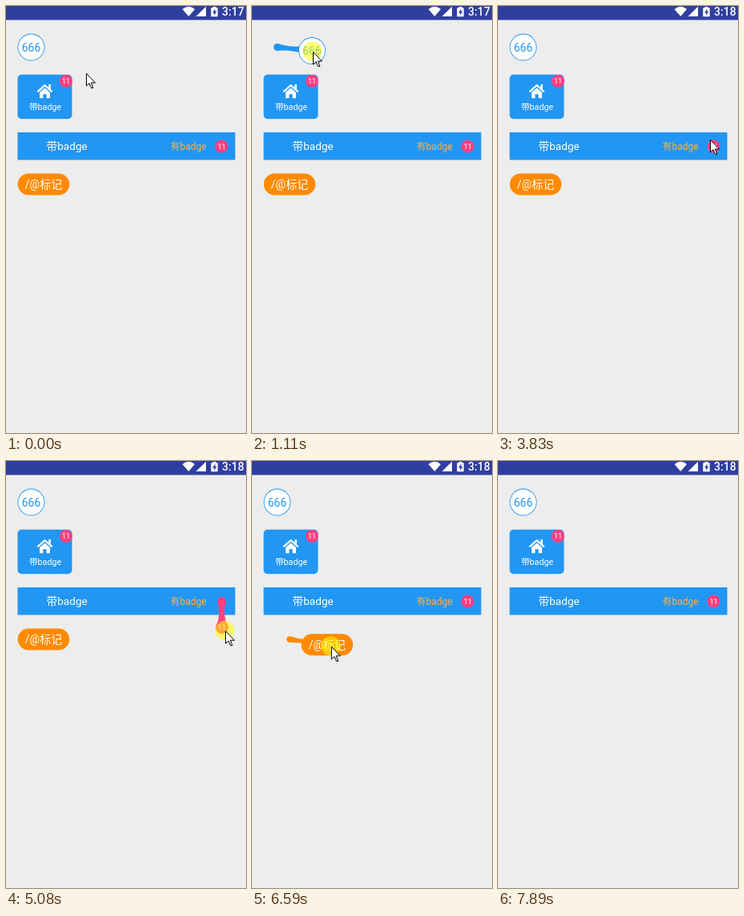
Write an HTML page with a canvas that moves like this. It is 300 px wide and 534 px high and loops after 8 s.

```html
<!DOCTYPE html>
<html lang="zh">
<head>
<meta charset="utf-8">
<style>
html, body { margin: 0; width: 100%; height: 100%; overflow: hidden; background: #ededed; }
canvas { display: block; width: 300px; height: 534px; }
</style>
</head>
<body>
<canvas id="stage" width="300" height="534"></canvas>
<script>
const c = document.getElementById('stage').getContext('2d');
const LOOP = 8000, BLUE = '#2196f3', PINK = '#ff4081', ORANGE = '#ff8a00';
const FONT = 'Roboto, "Noto Sans CJK SC", "Noto Sans CJK", sans-serif';

// pointer moves: start, end, x, y; it rests in between
const start = [100, 84];
const moves = [
  [30, 480, 34, 53], [560, 820, 60, 50], [870, 1110, 76, 57], [1610, 2200, 81, 88],
  [2430, 2540, 82, 90], [3230, 3620, 286, 170], [3620, 3830, 265, 167], [4010, 4160, 268, 175],
  [4340, 4860, 274, 212], [5080, 5300, 271, 248], [5710, 6250, 54, 225], [6300, 6990, 127, 236],
  [7140, 7230, 134, 239], [7420, 7560, 122, 242], [7710, 7890, 190, 176]
];

// w, h: half sizes; band: elastic radius; grip: centre relative to the pointer while dragged
// back: when it reappears after bursting; without it the badge springs home
const badges = [
  { x: 31.5, y: 51.5, w: 17, h: 17, band: 8, color: BLUE, fill: '#fff', label: '666', size: 14, from: 560, to: 1610, grip: [-1, -1] },
  { x: 75, y: 94, w: 8, h: 8, band: 8, color: PINK, label: '11', size: 9, from: 2430, to: 3230, grip: [-10, -0.5] },
  { x: 269.5, y: 175.5, w: 8, h: 8, band: 8, color: PINK, label: '11', size: 9, from: 4340, to: 5300, grip: [-4, -4], back: 5750 },
  { x: 47, y: 223, w: 32.3, h: 13.5, band: 7, color: ORANGE, label: '/@标记', size: 14, from: 6300, to: 7430, grip: [-5, -2], back: LOOP }
];

function pointer(t) {
  let [x, y] = start;
  for (const [from, to, nx, ny] of moves) {
    if (t <= from) break;
    const e = Math.sin(Math.min(1, (t - from) / (to - from)) * Math.PI / 2);
    x += (nx - x) * e;
    y += (ny - y) * e;
  }
  return [x, y];
}

function text(s, x, y, size, color = '#fff', align = 'center', weight = 400) {
  c.font = `${weight} ${size}px ${FONT}`;
  c.textAlign = align;
  c.fillStyle = color;
  c.fillText(s, x, y);
}

function box(x, y, w, h, r, color) {
  c.fillStyle = color;
  c.beginPath();
  c.roundRect(x, y, w, h, r);
  c.fill();
}

function disc(x, y, r, color) {
  box(x - r, y - r, 2 * r, 2 * r, r, color);
}

function shape(d, color) {
  c.fillStyle = color;
  c.fill(new Path2D(d));
}

function pill(b, x, y) {
  box(x - b.w, y - b.h, 2 * b.w, 2 * b.h, b.h, b.color);
  if (b.fill) disc(x, y, b.w - 0.9, b.fill);
  text(b.label, x, y + b.size * 0.36, b.size, b.fill ? b.color : '#fff');
}

// elastic band between the resting place and the dragged badge
function band(b, x, y) {
  const vx = x - b.x, vy = y - b.y, d = Math.hypot(vx, vy);
  if (d < 1 || d > 60) return;
  const R = b.band, r = R * (1 - d / 100), nx = -vy / d, ny = vx / d;
  const mx = (x + b.x) / 2, my = (y + b.y) / 2;
  disc(b.x, b.y, r, b.color);
  c.beginPath();
  c.moveTo(b.x + nx * r, b.y + ny * r);
  c.quadraticCurveTo(mx, my, x + nx * R, y + ny * R);
  c.lineTo(x - nx * R, y - ny * R);
  c.quadraticCurveTo(mx, my, b.x - nx * r, b.y - ny * r);
  c.fill();
}

function burst(b, x, y, u) {
  if (u >= 1) return;
  c.globalAlpha = 1 - u;
  for (let i = 0; i < 40; i++) {
    const px = (i * 0.618 % 1) * 2 - 1, py = (i * 0.377 % 1) * 2 - 1;
    disc(x + px * b.w, y + py * b.h * (1 + u * 0.2) + u * 3, 2.4 * (1 - u * 0.7), b.color);
  }
  c.globalAlpha = 1;
}

function drawBadge(b, t) {
  if (t < b.from || t >= (b.back || b.to + 220)) return pill(b, b.x, b.y);
  const [px, py] = pointer(Math.min(t, b.to));
  let x = px + b.grip[0], y = py + b.grip[1];
  if (t >= b.to) {
    if (b.back) return burst(b, x, y, (t - b.to) / 140);
    const u = (t - b.to) / 220 - 1, k = -u * u * (3.5 * u + 2.5); // overshoot
    x = b.x + (x - b.x) * k;
    y = b.y + (y - b.y) * k;
  }
  band(b, x, y);
  pill(b, x, y);
}

function statusBar(t) {
  box(0, 0, 300, 17.5, 0, '#303f9f');
  shape('M220.5 4Q228.5-2.5 236 4L228.3 13Z M237.5 13L250 .8V13Z', '#fff');
  shape('M258.5 1h4v1.2h2.2v11h-8.4v-11h2.2z', '#fff');
  shape('M261.5 3.5L258 8.4h2.2V12L263.2 7H261.5z', '#303f9f');
  text(t < 2700 ? '3:17' : '3:18', 270, 12.2, 14, '#fff', 'left', 500);
}

function card() {
  box(14.5, 85.7, 68, 55.5, 5, BLUE);
  shape('M53.3 98h2.6v6h-2.6z M42 108L48.5 102.4 55 108V115.3H50.6V110.3H46.4V115.3H42Z', '#fff');
  c.strokeStyle = '#fff';
  c.lineWidth = 2.2;
  c.stroke(new Path2D('M39.3 107.3L48.5 99.2 57.7 107.3'));
  text('带badge', 49, 129.5, 10.7);
}

function bar() {
  box(14.5, 158, 272, 34.4, 0, BLUE);
  text('带badge', 50.6, 180, 13.6, '#fff', 'left');
  text('有badge', 205.5, 179.8, 12, '#ffb03f', 'left');
}

function drawPointer(t) {
  if (t >= 7890) return;
  const [x, y] = pointer(t);
  if (badges.some(b => t >= b.from && t < b.to)) disc(x - 0.5, y - 0.5, 12, 'rgba(255,255,0,.55)');
  c.save();
  c.translate(x + 0.5, y + 0.5);
  const arrow = new Path2D('M0 0V15.5L3.6 12.2 6.2 18H8.4L6 11.5H11Z');
  c.fillStyle = '#fff';
  c.fill(arrow);
  c.strokeStyle = '#000';
  c.lineWidth = 1;
  c.stroke(arrow);
  c.restore();
}

function frame(now) {
  const t = now % LOOP;
  box(0, 0, 300, 534, 0, '#ededed');
  statusBar(t);
  card();
  bar();
  badges.forEach(b => drawBadge(b, t));
  drawPointer(t);
  requestAnimationFrame(frame);
}
requestAnimationFrame(frame);
</script>
</body>
</html>
```
